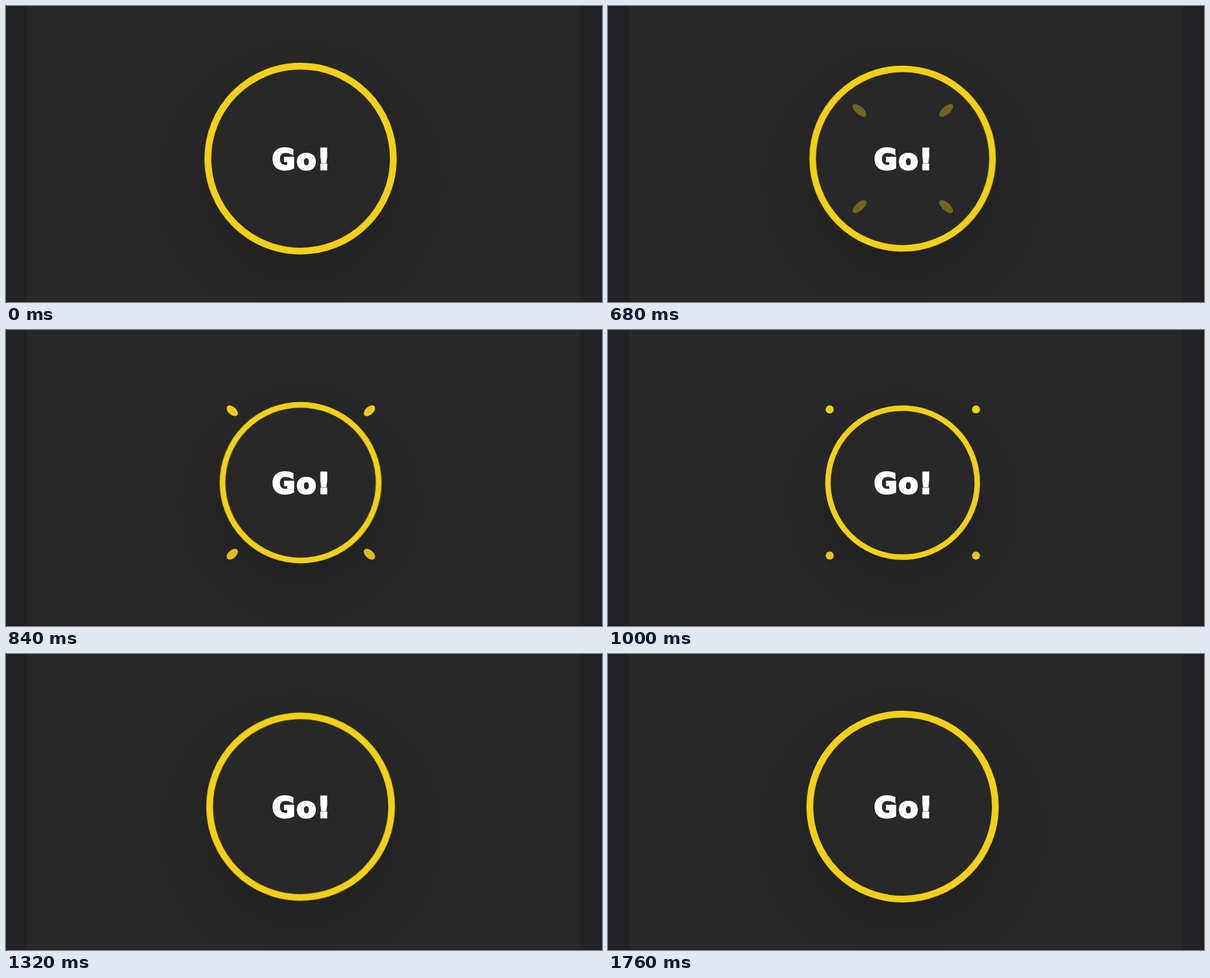
Write an HTML page that moves like this. It is 964 px wide and 480 px high and loops after 1.8 s.

```html
<!DOCTYPE html>
<html lang="en">
<head>
<meta charset="utf-8">
<title>Go button</title>
<style>
  html, body { margin: 0; width: 100%; height: 100%; overflow: hidden; background: #222225; }
  #stage { position: relative; width: 964px; height: 480px; overflow: hidden; }
  #panel { position: absolute; left: 34px; width: 895px; height: 480px; background: #282828; }
  #floor { position: absolute; top: 478.5px; width: 964px; height: 2px; background: #1e1519; }
  #ring {
    position: absolute; left: 321.2px; top: 92.1px; width: 311px; height: 311px;
    box-sizing: border-box; border: 11px solid #f2d014; border-radius: 50%;
    box-shadow: 0 42px 80px rgba(0, 0, 0, .2);
  }
  svg { position: absolute; left: 0; top: 0; }
  text {
    font: 700 46px "DejaVu Sans", sans-serif; letter-spacing: 2px;
    fill: #fff; stroke: #fff; stroke-width: 3px;
  }
</style>
</head>
<body>
<div id="stage">
  <div id="panel"></div>
  <svg width="964" height="480">
    <g id="dots" fill="#f0cf16"></g>
    <text x="430.2" y="264.5">Go!</text>
  </svg>
  <div id="ring"></div>
  <div id="floor"></div>
</div>
<script>
const LOOP = 1800, STEP = 40, SHRINK = 622, GROW = 1045, DURATION = 436;
const ring = document.getElementById('ring');
const group = document.getElementById('dots');
const corners = [[-1, -1], [1, -1], [-1, 1], [1, 1]];
const dots = corners.map(() =>
  group.appendChild(document.createElementNS('http://www.w3.org/2000/svg', 'ellipse')));

const mix = (a, b, p) => a + (b - a) * p;
const clamp = x => Math.min(1, Math.max(0, x));
const bezier = (a, b, u) => 3 * a * u * (1 - u) ** 2 + 3 * b * u * u * (1 - u) + u ** 3;

// The CSS "ease" curve, solved by bisection
function ease(x) {
  if (x <= 0 || x >= 1) return clamp(x);
  let low = 0, high = 1;
  for (let i = 0; i < 24; i++) {
    const mid = (low + high) / 2;
    if (bezier(.25, .25, mid) < x) low = mid; else high = mid;
  }
  return bezier(.1, 1, low);
}

function dotPose(t) {
  const age = t - (t < GROW ? SHRINK : GROW);
  if (t < GROW) return {
    x: mix(58, 118.3, ease(age / 370)),
    y: mix(61, 118.5, ease(age / 290)),
    length: mix(28, 13, clamp(age / 340) ** 2),
    alpha: ease(age / 250)
  };
  const p = ease(age / DURATION);
  return {
    x: mix(118.3, 36, p),
    y: mix(118.5, 69, p),
    length: mix(13, 83, p),
    alpha: 1 - clamp(age / 230) ** 2
  };
}

function draw(t) {
  const pressed = ease((t - SHRINK) / DURATION) * (1 - ease((t - GROW) / DURATION));
  ring.style.transform = `scale(${1 - .197 * pressed})`;

  const pose = dotPose(t);
  group.setAttribute('opacity', pose.alpha);
  dots.forEach((dot, i) => {
    const [sx, sy] = corners[i];
    dot.setAttribute('rx', pose.length / 2);
    dot.setAttribute('ry', 6.5);
    dot.setAttribute('transform',
      `translate(${476.9 + sx * pose.x} ${247.3 + sy * pose.y}) rotate(${sx * sy * 42})`);
  });
}

let start;
function tick(now) {
  start ??= now;
  draw(Math.floor((now - start + 4) / STEP) * STEP % LOOP);
  requestAnimationFrame(tick);
}
draw(0);
requestAnimationFrame(tick);
</script>
</body>
</html>
```
